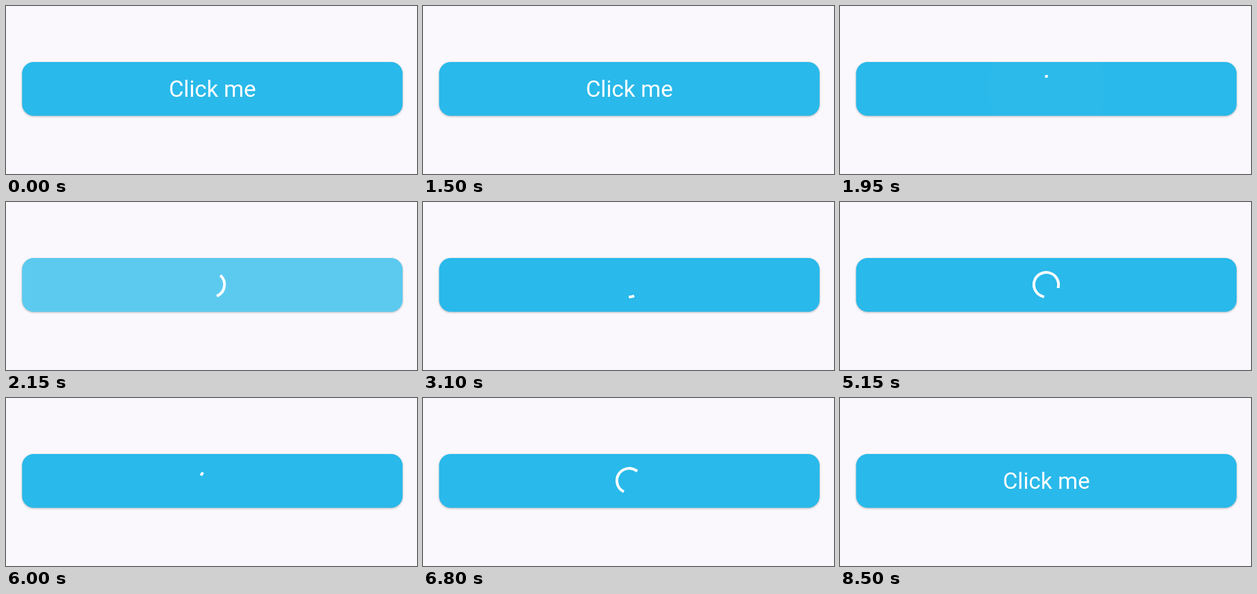
These frames come from a looping animation (600 by 246 pixels, 8.75 s). An HTML page:

```html
<!DOCTYPE html>
<html lang="en">
<head>
<meta charset="utf-8">
<title>Loading button</title>
<style>
  html, body { margin: 0; width: 100%; height: 100%; overflow: hidden; background: #faf8fc; }
  svg { display: block; width: 100%; height: 100%; }
  .shadow { filter: drop-shadow(0 1.5px 1.8px rgba(0, 0, 0, .27)); }
  text { font: 400 33.3px Roboto, sans-serif; fill: #fff; text-anchor: middle; }
</style>
</head>
<body>
<svg viewBox="0 0 600 246">
  <clipPath id="clip"><rect x="23.5" y="82" width="555.5" height="78.7" rx="17"/></clipPath>
  <rect class="shadow" x="23.5" y="82" width="555.5" height="78.7" rx="17" fill="#29b9ea"/>
  <g clip-path="url(#clip)"><circle id="ripple" cx="301.2" cy="121.3" fill="#fff"/></g>
  <text id="label" x="301.3" y="132.8">Click me</text>
  <path id="arc" fill="none" stroke="#fff" stroke-width="4" stroke-linecap="square"/>
</svg>
<script>
const LOOP = 8750, STEP = 50;
const TAP = 1945, LOAD = 5000;
const CYCLE = 1333, TURN = 2222;
const CX = 301, CY = 121, R = 18;
const REACH = 280;

const $ = id => document.getElementById(id);
const ripple = $('ripple'), label = $('label'), arc = $('arc');
const clamp = v => Math.min(1, Math.max(0, v));

// CSS-style cubic bezier, solved by bisection
function bezier(x1, y1, x2, y2) {
  const at = (a, b, u) => 3 * a * u * (1 - u) ** 2 + 3 * b * u * u * (1 - u) + u ** 3;
  return x => {
    if (x <= 0 || x >= 1) return clamp(x);
    let lo = 0, hi = 1;
    for (let i = 0; i < 30; i++) {
      const mid = (lo + hi) / 2;
      if (at(x1, x2, mid) < x) lo = mid; else hi = mid;
    }
    return at(y1, y2, lo);
  };
}
const ease = bezier(.25, .1, .25, 1);
const fastOutSlowIn = bezier(.4, 0, .2, 1);

const point = a => `${CX + R * Math.cos(a)} ${CY + R * Math.sin(a)}`;

function spinnerPath(t) {
  const p = t % CYCLE / CYCLE;
  const head = fastOutSlowIn(clamp(p * 2));
  const tail = fastOutSlowIn(clamp(p * 2 - 1));
  const start = Math.PI * (-.5 + 1.5 * tail + 2 * t / TURN + .5 * p);
  const sweep = Math.max(1.5 * Math.PI * (head - tail), .001);
  return `M${point(start)}A${R} ${R} 0 ${sweep > Math.PI ? 1 : 0} 1 ${point(start + sweep)}`;
}

function draw(time) {
  const t = Math.floor(time % LOOP / STEP) * STEP - TAP;
  const loading = t >= 0 && t < LOAD;
  label.style.display = loading ? 'none' : '';
  arc.style.display = loading ? '' : 'none';
  if (loading) arc.setAttribute('d', spinnerPath(t));

  const fade = clamp(t / 75) * (1 - clamp((t - 225) / 150));
  ripple.setAttribute('r', REACH * .3 + (REACH * .7 + 5) * ease(clamp(t / 225)));
  ripple.setAttribute('opacity', .24 * fade);
}

const begin = performance.now();
function tick() {
  draw(performance.now() - begin);
  requestAnimationFrame(tick);
}
tick();
</script>
</body>
</html>
```
